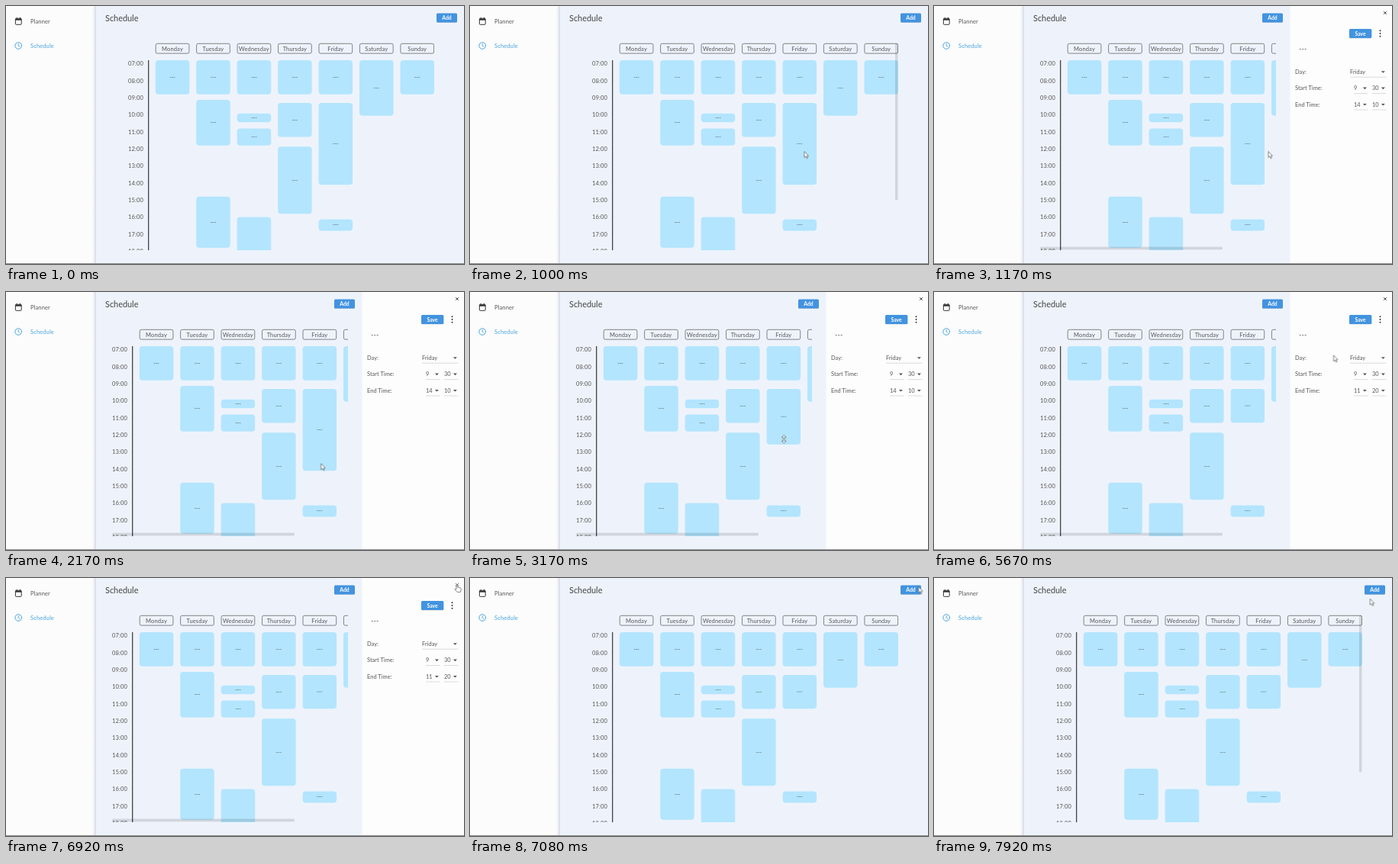
An HTML page that plays this animation: 600x338 px, repeating every 8000 ms.

```html
<!DOCTYPE html>
<html lang="en">
<head>
<meta charset="utf-8">
<title>Schedule</title>
<style>
html, body { margin: 0; width: 100%; height: 100%; overflow: hidden; background: #eef3fb; }
svg { display: block; width: 600px; height: 338px; }
text { font: 7.5px Lato, sans-serif; letter-spacing: .13px; fill: #555; }
.mid { text-anchor: middle; }
.title { font-size: 10.9px; letter-spacing: 0; fill: #444; }
.btn { font-weight: 700; font-size: 6.8px; letter-spacing: 0; fill: #fff; }
.dash { font-size: 7px; letter-spacing: -.1px; }
#form text { font-size: 7.4px; letter-spacing: .05px; }
.block { fill: #b3e5fe; }
.bar { fill: #000; fill-opacity: .12; }
.rule { stroke: #ccc; stroke-width: .7; }
#cursor path { fill: #fff; stroke: #555; stroke-width: .7; stroke-linejoin: round; }
</style>
</head>
<body>
<svg viewBox="0 0 600 338">
  <defs>
    <clipPath id="view"><rect x="118" y="47" width="448" height="272.6"/></clipPath>
    <linearGradient id="shade">
      <stop stop-color="#fcfcfd"/><stop offset="1" stop-color="#dfe2ea"/>
    </linearGradient>
  </defs>
  <rect width="600" height="338" fill="#eef3fb"/>

  <rect width="118" height="338" fill="#fcfcfd"/>
  <rect x="113" width="4.5" height="338" fill="url(#shade)"/>
  <rect x="117.3" width=".7" height="338" fill="#cbd4ea"/>
  <g fill="none" stroke="#333">
    <rect x="12.4" y="16.3" width="7.8" height="8" rx=".8"/>
    <path d="M12.4 17.7h7.8" stroke-width="2"/>
    <path d="M14.2 14.8v2M18.4 14.8v2"/>
  </g>
  <g fill="none" stroke="#4ba3dc">
    <circle cx="16.2" cy="52" r="4.3"/>
    <path d="M16.1 49.3v2.9l2 1.2" stroke-width=".9"/>
  </g>
  <text x="32" y="22.7">Planner</text>
  <text x="32" y="54.7" style="fill:#4ba3dc">Schedule</text>
  <text class="title" x="130" y="19.6">Schedule</text>

  <g clip-path="url(#view)"><g id="grid"></g></g>
  <rect id="vbar" class="bar" x="557" y="48.5" width="3.5" height="206" rx="1.5"/>

  <g id="open">
    <rect x="448" y="40" width="19" height="290" fill="#eef3fb"/>
    <rect class="bar" x="139" y="315.6" width="239" height="3.6" rx="1.5"/>
    <rect x="466.5" width="133.5" height="338" fill="#fdfdfd"/>
    <path d="M589.2 7.2l3.6 3.6M592.8 7.2l-3.6 3.6" stroke="#333" stroke-width=".9"/>
    <path d="M584.5 32.3v7.5" stroke="#333" stroke-width="2" stroke-linecap="round" stroke-dasharray="0 3.7"/>
    <g id="save"></g>
    <text x="478" y="58.8" style="font-size:9px">---</text>
    <g id="form"></g>
  </g>

  <g id="add"></g>
  <rect y="337" width="600" height="1" fill="#858585"/>

  <g id="cursor">
    <path id="arrow" d="M0 0V8L1.9 6.3 3.2 9.2 4.5 8.6 3.2 5.9H5.6Z"/>
    <path id="sizer" d="M0-5.5L2.8-2.4H.9V2.4H2.8L0 5.5-2.8 2.4H-.9V-2.4H-2.8Z"/>
    <path id="hand" d="M0 5V0Q.9-1.2 1.7 0V3.2L5.6 4.2Q6.5 4.6 6.3 5.8L5.4 9.4H1L-2.2 5.8Q-1.8 4.3 0 5.6Z"/>
  </g>
</svg>
<script>
const STEPS = 96;
const $ = id => document.getElementById(id);
const mid = (x, y, s, cls = '') => `<text class="mid ${cls}" x="${x}" y="${y}">${s}</text>`;
const yOf = hour => 71 + (hour - 7) * 22.35;

const button = (x, y, w, s) => `<rect x="${x}" y="${y + .6}" width="${w}" height="12" rx="1.5" opacity=".16"/>
  <rect x="${x}" y="${y}" width="${w}" height="12" rx="1.5" fill="#4293e0"/>${mid(x + w / 2, y + 8.5, s, 'btn')}`;
$('save').innerHTML = button(544, 30, 29.3, 'Save');
$('add').innerHTML = button(564, 9.5, 27, 'Add');

// Weekly grid: day name, then spans in hours
const week = `Monday 7-9
Tuesday 7-9 9.33-12 15-18
Wednesday 7-9 10.12-10.63 11-12 16.2-21
Thursday 7-9 9.5-11.5 12.07-16
Friday 7-9 9.5-14.3 16.33-17
Saturday 7-10.25
Sunday 7-9`.split('\n').map(line => line.split(' '));

let grid = '<path d="M186.7 71V320" stroke="#333" stroke-width="1.2"/>';
for (let h = 7; h <= 18; h++)
  grid += `<text x="160" y="${yOf(h) + 7.3}">${String(h).padStart(2, '0')}:00</text>`;
week.forEach(([name, ...spans], d) => {
  const x = 195.8 + d * 53.45, c = x + 22.2;
  grid += `<rect x="${x + .4}" y="49.3" width="43.7" height="12.8" rx="2" fill="none" stroke="#666" stroke-width=".8"/>`;
  grid += mid(c, 58.6, name);
  spans.forEach((span, i) => {
    const [top, end] = span.split('-').map(yOf);
    const live = name === 'Friday' && i === 1;
    grid += `<rect class="block" ${live ? 'id="block"' : ''} x="${x}" y="${top}" width="44.5" height="${end - top}" rx="4"/>
      <g ${live ? 'id="label"' : ''}>${mid(c, (top + end) / 2 + 2.3, '---', 'dash')}</g>`;
  });
});
$('grid').innerHTML = grid;

// Side form
const label = (y, s) => `<text x="473" y="${y + 2.7}">${s}</text>`;
const field = (x, end, y, s) => `<text x="${x}" y="${y + 2.7}">${s}</text>
  <path d="M${end - 6.6} ${y - 1}h5l-2.5 2.6z" fill="#555"/><path class="rule" d="M${x} ${y + 7}H${end}"/>`;
const time = (y, h, m) => field(550, 568.5, y, h) + field(574, 592.5, y, m);
$('form').innerHTML = label(86.2, 'Day:') + label(107.6, 'Start Time:') + label(129, 'End Time:')
  + field(545, 592.5, 86.2, 'Friday') + time(107.6, 9, 30)
  + `<g id="before">${time(129, 14, 10)}</g><g id="after">${time(129, 11, 20)}</g>`;

// Every part is a function of the step, on a grid of 12 steps per second
const sheet = document.createElement('style');
function track(id, css) {
  let keys = '', last;
  for (let s = 0; s <= STEPS; s++) {
    const now = css(Math.min(s, STEPS - 1));
    if (now !== last || s === STEPS) keys += `${s / STEPS * 100}% { ${now} } `;
    last = now;
  }
  sheet.textContent += `@keyframes ${id}-track { ${keys} }
    #${id} { animation: ${id}-track 8s -5ms step-end infinite }\n`;
}
const ramp = (s, a, b) => Math.min(1, Math.max(0, (s - a) / (b - a)));
const easeOut = (u, power) => 1 - (1 - u) ** power;
// Each move is [from step, to step, power, target]
const glide = (start, moves) => s => moves.reduce((v, [a, b, power, to]) =>
  v + (to - v) * easeOut(ramp(s, a, b), power), start);
const show = (id, on) => track(id, s => `opacity: ${+on(s)}`);
const move = (id, x, y) => track(id, s => `transform: translate(${x(s).toFixed(2)}px, ${y(s).toFixed(2)}px)`);
const still = () => 0;

const opened = 14, grabbed = 29, released = 63, closed = 85;
const isOpen = s => s >= opened && s < closed;
const sizing = s => s >= grabbed && s < released;
const pointing = s => s >= 83 && s < closed;

show('open', isOpen);
move('grid', s => isOpen(s) ? -21 : 0, still);
move('add', s => isOpen(s) ? -134 : 0, still);
show('before', s => s < released);
show('after', s => s >= released);
show('vbar', s => isOpen(s) ? 0 : s < opened ? ramp(s, 5, 8) : ramp(s, closed, 88));

const height = glide(107.3, [[35, 44, 1.8, 41], [47, 51, 1, 44.3]]);
track('block', s => `height: ${height(s).toFixed(2)}px`);
move('label', still, s => (height(s) - 107.3) / 2);

const path = [
  [5, 12, 1.6, 438, 190.5], [15, 18, 1, 417, 199], [20, 27, 1, 412, 229], [28, 29, 1, 411.3, 234],
  [35, 44, 2.3, 411.3, 166], [47, 51, 1, 411.3, 168.7], [62, 68, 1.3, 523.5, 82.8],
  [68, 75, 1, 481, 118], [75, 82, 1.5, 590, 9], [84, 95, 1.5, 571.3, 27.2]
];
const along = (start, axis) => glide(start, path.map(([a, b, power, ...to]) => [a, b, power, to[axis]]));
move('cursor', along(564, 0), along(45, 1));
show('arrow', s => s > 5 && !sizing(s) && !pointing(s));
show('sizer', sizing);
show('hand', pointing);
document.head.append(sheet);
</script>
</body>
</html>
```
